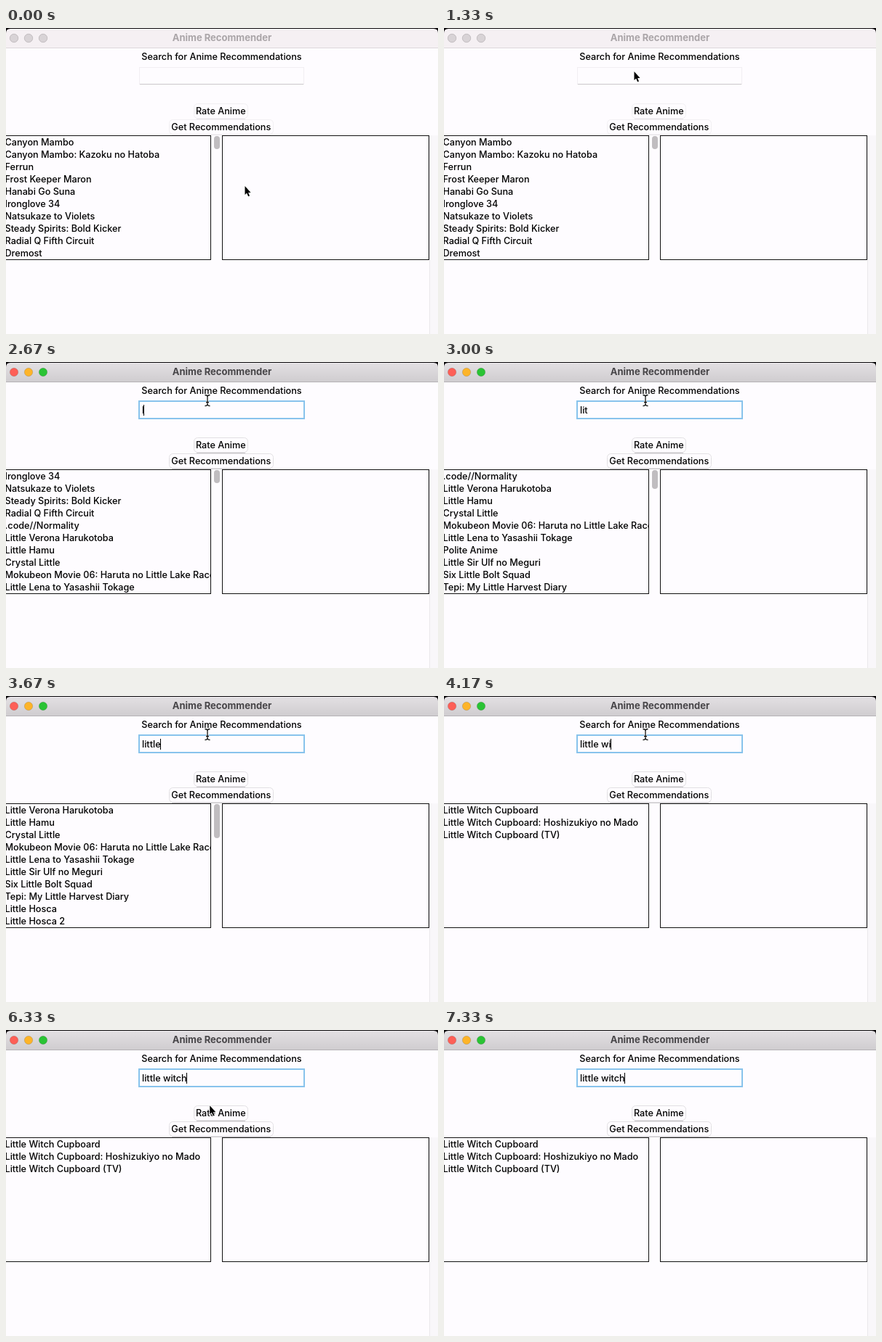
These frames come from a looping animation (594 px wide and 422 px high, 7490 ms). An HTML page:

```html
<!DOCTYPE html>
<html lang="en">
<head>
<meta charset="utf-8">
<title>Anime Recommender</title>
<style>
  html, body { margin: 0; width: 100%; height: 100%; overflow: hidden; background: #fefcff; }
  svg { display: block; width: 100vw; height: 100vh; }
  text { font: 500 12.65px Inter, Roboto, sans-serif; white-space: pre; fill: #000; }
  .middle { text-anchor: middle; }
  .title { font-size: 13px; font-weight: 700; fill: #aaa5a8; }
  .bar { fill: #f5f0f3; }
  .rule { fill: #dcd7da; }
  .light { fill: #d8d3d6; stroke: #c4bfc2; stroke-width: 1; }
  .button { fill: #fefcff; stroke: #f2f0f3; }
  .shade { fill: none; stroke: #e9e6ea; }
  .ring { display: none; fill: #fefcff; stroke: #88c3ec; stroke-width: 2; }
  .list { fill: none; stroke: #111; }
  .active .title { fill: #474548; }
  .active .bar { fill: url(#chrome); }
  .active .rule { fill: #b5b2b5; }
  .active .light { stroke: #0002; }
  .active .red { fill: #fe5f57; }
  .active .yellow { fill: #fdb429; }
  .active .green { fill: #2ac334; }
  .active .button { stroke: #e2e0e3; }
  .active .shade { stroke: #cbc9cc; }
  .active .ring { display: inline; }
  .active .field { display: none; }
</style>
</head>
<body>
<svg id="stage" viewBox="0 0 594 422">
  <defs>
    <linearGradient id="chrome" x2="0" y2="1">
      <stop stop-color="#e3e0e3"/><stop offset="1" stop-color="#cfcccf"/>
    </linearGradient>
    <clipPath id="listClip"><path d="M0 149H282V319H0Z"/></clipPath>
    <path id="beamShape" d="M-3.5 -7.5Q0 -7.5 0 -5Q0 -7.5 3.5 -7.5M0 -5V5M-3.5 7.5Q0 7.5 0 5Q0 7.5 3.5 7.5M-2 2.5H2"/>
  </defs>

  <rect width="594" height="422" fill="#fefcff"/>
  <rect width="594" height="12" fill="#0c0a0c"/>
  <path class="bar" d="M0 28V7Q0 1 6 1H588Q594 1 594 7V28Z"/>
  <rect class="rule" y="27" width="594" height="1"/>
  <circle class="light red" cx="11" cy="14" r="5.7"/>
  <circle class="light yellow" cx="31" cy="14" r="5.7"/>
  <circle class="light green" cx="51" cy="14" r="5.7"/>
  <text class="title middle" x="297" y="18">Anime Recommender</text>

  <text class="middle" x="296.5" y="44">Search for Anime Recommendations</text>
  <g class="field">
    <rect x="183.5" y="54.5" width="226" height="23" fill="none" stroke="#f1eef2"/>
    <path d="M184 77.5H409" stroke="#cbc8cb"/>
  </g>
  <rect class="ring" x="183" y="54" width="227" height="24"/>
  <text id="query" x="187" y="71"></text>
  <path id="caret" d="M0 59V74" stroke="#000"/>

  <rect class="button" x="258.5" y="104.5" width="74" height="20" rx="5"/>
  <path class="shade" d="M262 125.5H329"/>
  <text class="middle" x="295.3" y="119">Rate Anime</text>
  <rect class="button" x="224.5" y="126.5" width="143" height="20" rx="5"/>
  <path class="shade" d="M228 147.5H364"/>
  <text class="middle" x="295.8" y="141">Get Recommendations</text>

  <rect x="582" y="148" width="12" height="274" fill="#f9f7fa"/>
  <path d="M582.5 148V422" stroke="#eae8eb"/>
  <rect class="list" x="-5.5" y="148.5" width="287" height="171"/>
  <rect class="list" x="297.5" y="148.5" width="284" height="171"/>
  <g id="rows" clip-path="url(#listClip)"></g>
  <rect id="thumb" x="286" y="149" width="8" rx="4" fill="#c0bdc0"/>

  <path id="arrow" d="M.5 1V13L3.1 10.6L5.1 15.2L7 14.4L5.1 9.9H8.6Z" fill="#000" stroke="#fff" stroke-width="1.8" paint-order="stroke"/>
  <g id="beam" fill="none">
    <use href="#beamShape" stroke="#fff" stroke-width="3"/>
    <use href="#beamShape" stroke="#111" stroke-width="1.3"/>
  </g>
</svg>
<script>
const LOOP = 7490, STEP = 1000 / 6, PAGE = 10;
const PHRASE = "little witch";
const catalogue = [
  "Canyon Mambo", "Canyon Mambo: Kazoku no Hatoba", "Ferrun", "Frost Keeper Maron",
  "Hanabi Go Suna", "Ironglove 34", "Natsukaze to Violets", "Steady Spirits: Bold Kicker",
  "Radial Q Fifth Circuit", "Dremost",
  ".code//Normality", "Little Verona Harukotoba", "Little Hamu", "Crystal Little",
  "Mokubeon Movie 06: Haruta no Little Lake Race", "Little Lena to Yasashii Tokage",
  "Polite Anime", "Little Sir Ulf no Meguri", "Six Little Bolt Squad",
  "Tepi: My Little Harvest Diary", "Little Hosca", "Little Hosca 2",
  "Little Witch Cupboard", "Little Witch Cupboard: Hoshizukiyo no Mado",
  "Little Witch Cupboard (TV)"
];

const $ = id => document.getElementById(id);
const show = (el, on) => el.setAttribute("visibility", on ? "visible" : "hidden");
const moveTo = (el, x, y) => el.setAttribute("transform", `translate(${x} ${y})`);
const clamp = v => Math.min(1, Math.max(0, v));
const ease = v => v * v * (3 - 2 * v);
const mix = (a, b, v) => a + (b - a) * v;

const rows = Array.from({ length: PAGE }, (_, i) => {
  const row = document.createElementNS("http://www.w3.org/2000/svg", "text");
  row.setAttribute("x", -1.5);
  row.setAttribute("y", 162 + 17 * i);
  return $("rows").appendChild(row);
});

function drawList(query) {
  const found = catalogue.filter(name => name.toLowerCase().includes(query));
  rows.forEach((row, i) => row.textContent = found[i] || "");
  show($("thumb"), found.length > PAGE);
  $("thumb").setAttribute("height", query.length < 3 ? 18 : query.length < 4 ? 26 : 47);
}

function drawPointer(tick) {
  const approach = ease(clamp((tick - 3) / 5));
  const settle = clamp((tick - 8) / 2);
  const leave = clamp((tick - 37) / 4);
  const x = mix(mix(mix(328, 261, approach), 277, settle), 288, leave);
  const y = mix(mix(mix(217, 59, approach), 53, settle), 254, leave);
  const typing = tick >= 9 && leave === 0;
  show($("beam"), typing);
  show($("arrow"), !typing && tick < 42);
  moveTo($("beam"), x, y);
  moveTo($("arrow"), x, y);
}

function draw(tick) {
  const active = tick >= 9;
  const typed = Math.max(0, tick - 15 - (tick > 21));
  const query = PHRASE.slice(0, typed);
  $("stage").classList.toggle("active", active);
  $("query").textContent = query;
  const width = query ? $("query").getComputedTextLength() : 0;
  moveTo($("caret"), Math.round(186 + width) + 0.5, 0);
  show($("caret"), active && (tick * STEP - 1425) % 905 < 600);
  drawList(query);
  drawPointer(tick);
}

const start = performance.now();
let shown = -1;
function frame() {
  const time = (performance.now() - start) % LOOP;
  const tick = Math.min(44, Math.floor((time + 4) / STEP));
  if (tick !== shown) draw(shown = tick);
  requestAnimationFrame(frame);
}
frame();
</script>
</body>
</html>
```
